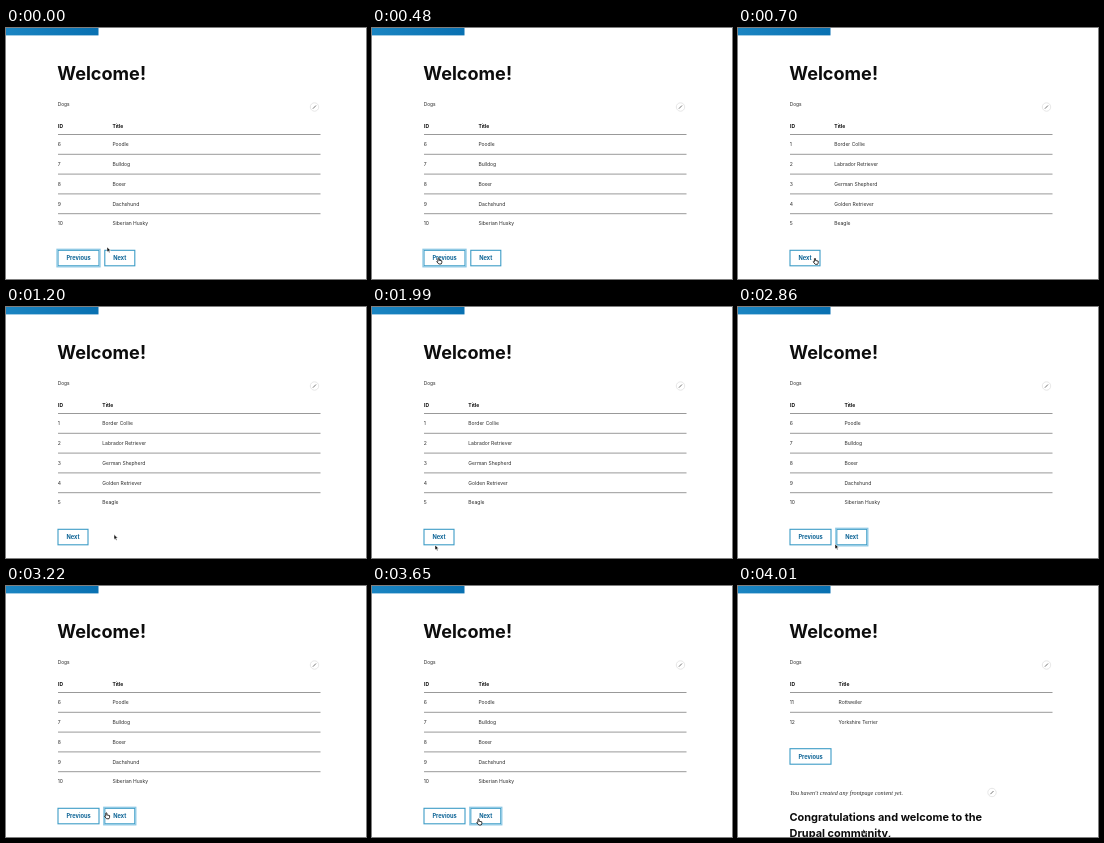
An HTML page that plays this animation: 360 px wide and 251 px high, repeating every 4.06 s.

```html
<!DOCTYPE html>
<html lang="en">
<head>
<meta charset="utf-8">
<style>
  html, body { margin: 0; width: 100%; height: 100%; overflow: hidden; background: #fff; }
  svg { display: block; width: 360px; height: 251px; font: 5px Inter, sans-serif; fill: #2a2a2a; }
  .bold { font-weight: 700; fill: #0d0d0d; }
  .button { font-size: 5.7px; font-weight: 700; fill: #0d6496; }
  .box { fill: #fff; stroke: #3c9cc6; stroke-width: 1.1; }
  .ring { fill: none; stroke: #8dc8e4; stroke-width: 1.3; }
  .rule { stroke: #777; stroke-width: .75; }
  .note { font: italic 6.13px "Liberation Serif", serif; }
</style>
</head>
<body>
<svg viewBox="0 0 360 251">
  <defs>
    <linearGradient id="blue"><stop stop-color="#1b85c2"/><stop offset="1" stop-color="#0870b1"/></linearGradient>
    <g id="edit">
      <circle r="4.2" fill="#fff" stroke="#ddd" stroke-width=".7"/>
      <path d="M-1.6 1.7L1.5-1.5" stroke="#777" stroke-width="1"/>
    </g>
  </defs>
  <rect width="92.5" height="7.4" fill="url(#blue)"/>
  <text class="bold" x="51.3" y="51.5" font-size="18.1">Welcome!</text>
  <text x="51.7" y="77.8" font-size="4.8">Dogs</text>
  <use href="#edit" x="308.5" y="79"/>
  <g id="pages"></g>
  <g id="cursor" stroke="#fff" stroke-width=".5" fill="#111">
    <path id="arrow" d="M0 0V5L1.2 4L2.1 5.8L3 5.4L2.2 3.6H3.7Z"/>
    <path id="hand" fill="#fff" stroke="#222" stroke-width=".9"
      d="M0 .3Q.6-.3 1.1.3V2.2L3.8 2.8V4.6L3.2 6H.8L-1.3 3.5Q-1 2.7 0 3.4Z"/>
  </g>
</svg>
<script>
const LOOP = 4060;
const $ = id => document.getElementById(id);
const text = (x, y, s, cls = '') => `<text x="${x}" y="${y}" class="${cls}">${s}</text>`;

function button(x, y, label, id = '') {
  const w = label === 'Next' ? 30 : 41;
  return `<rect class="box" x="${x}" y="${y}" width="${w}" height="15.5"/>` +
    (id && `<rect class="ring" id="${id}" x="${x - 1}" y="${y - 1}" width="${w + 2}" height="17.5"/>`) +
    text(x + 8.4, y + 9.8, label, 'button');
}

function table(first, column, titles) {
  return text(52, 99.7, 'ID', 'bold') + text(column, 99.7, 'Title', 'bold') +
    titles.map((title, i) => {
      const y = 106.5 + i * 19.8;
      return `<path class="rule" d="M52 ${y}H314.5"/>` +
        text(51.8, y + 11.7, first + i) + text(column, y + 11.7, title);
    }).join('');
}

const pages = [
  table(1, 96.3, ['Border Collie', 'Labrador Retriever', 'German Shepherd', 'Golden Retriever', 'Beagle']) +
    button(52, 222.3, 'Next'),
  table(6, 106.4, ['Poodle', 'Bulldog', 'Boxer', 'Dachshund', 'Siberian Husky']) +
    button(52, 222.3, 'Previous', 'previousRing') + button(98.8, 222.3, 'Next', 'nextRing'),
  table(11, 100.5, ['Rottweiler', 'Yorkshire Terrier']) +
    button(52, 162.7, 'Previous') +
    text(52, 208.7, "You haven't created any frontpage content yet.", 'note') +
    '<use href="#edit" x="254" y="206.5"/><g font-size="10.95">' +
    text(51.5, 234.5, 'Congratulations and welcome to the', 'bold') +
    text(51.5, 250.7, 'Drupal community,', 'bold') + '</g>'
];
$('pages').innerHTML = pages.map(p => `<g>${p}</g>`).join('');

// Pointer stops: time, x, y
const stops = [
  [0, 101, 219], [50, 101, 219], [410, 66, 230], [620, 66, 230], [840, 100, 231],
  [1060, 105, 230], [1200, 108, 227.5], [1560, 108, 227.5], [1850, 63, 238], [1990, 63, 238],
  [2140, 66, 230], [2420, 66, 230], [2640, 88, 241], [2780, 97, 237], [2860, 97, 237],
  [3290, 100, 226], [3430, 106, 233], [3800, 106, 233], [4010, 125, 243], [LOOP, 125, 243]
];

function pointerAt(t) {
  const i = stops.findIndex(s => s[0] > t);
  const [t0, x0, y0] = stops[i - 1], [t1, x1, y1] = stops[i];
  const k = (t - t0) / (t1 - t0), e = k * k * (3 - 2 * k);
  return [x0 + (x1 - x0) * e, y0 + (y1 - y0) * e];
}

const show = (el, on) => el.setAttribute('visibility', on ? 'visible' : 'hidden');

function draw(now) {
  const t = now % LOOP;
  const page = t < 550 ? 1 : t < 2350 ? 0 : t < 3790 ? 1 : 2;
  [...$('pages').children].forEach((g, i) => g.style.display = i === page ? '' : 'none');
  show($('previousRing'), t < 550);
  show($('nextRing'), t >= 2350);

  const [x, y] = pointerAt(t);
  const inside = (left, right) => x > left && x < right && y > 222 && y < 237;
  const hover = page === 0 ? inside(52, 82) : page === 1 && (inside(52, 93) || inside(99, 129));
  $('cursor').setAttribute('transform', `translate(${x} ${y})`);
  show($('arrow'), !hover);
  show($('hand'), hover);
  requestAnimationFrame(draw);
}
requestAnimationFrame(draw);
</script>
</body>
</html>
```
